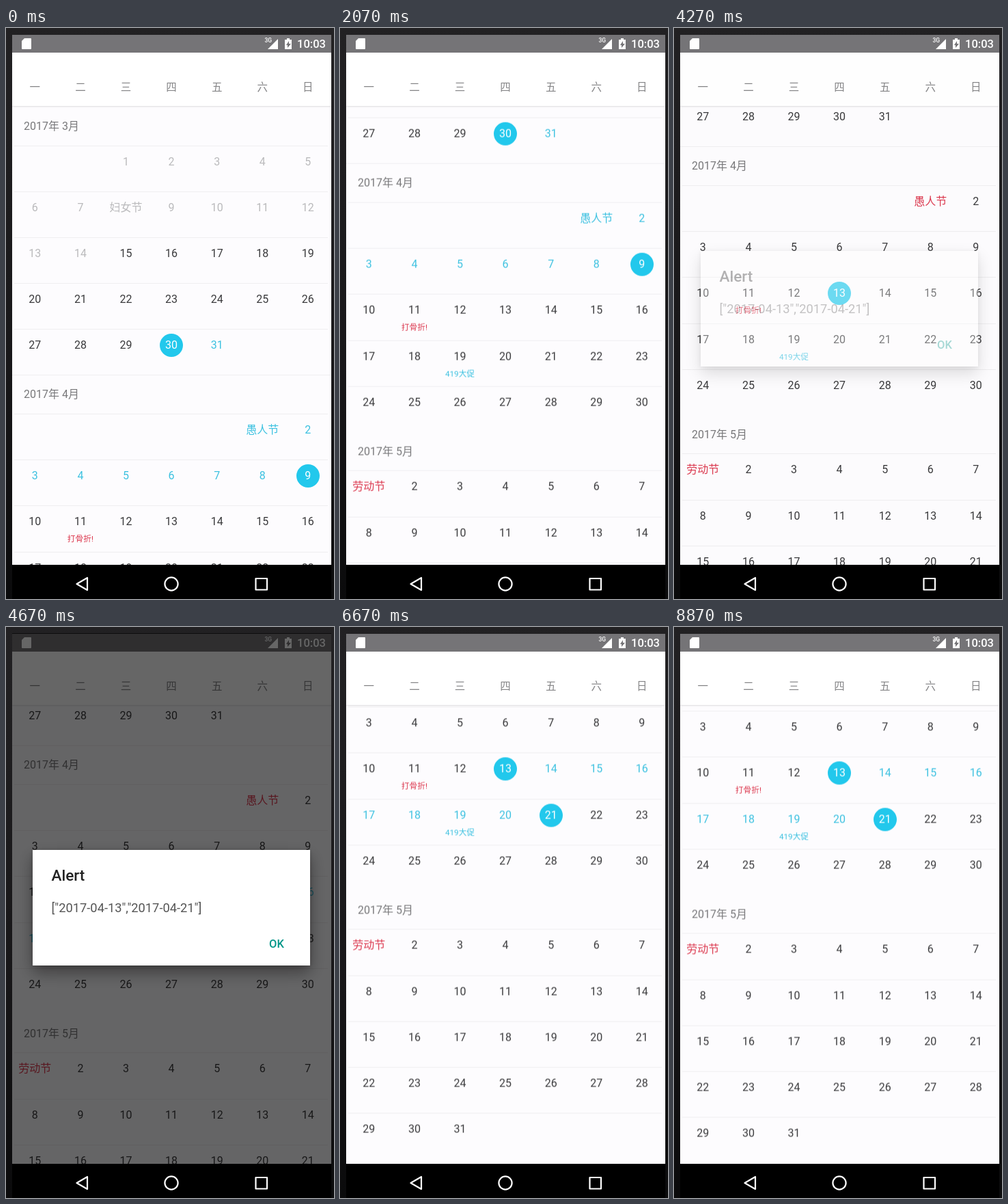
Recreate the animation shown at these times as an HTML page. Size 480 by 835 pixels, loop 8.94 s.

```html
<!DOCTYPE html>
<html lang="zh-CN">
<head>
<meta charset="utf-8">
<title>Calendar</title>
<style>
html, body { margin: 0; width: 100%; height: 100%; overflow: hidden; background: #000; }
body { font: 16px/34px Roboto, "Noto Sans CJK SC", "Noto Sans CJK", sans-serif; }
#stage { position: relative; width: 480px; height: 835px; overflow: hidden;
  background: linear-gradient(#222123, #181719 60%, #0b0b0c); }
#stage > * { position: absolute; }
#view { left: 9px; top: 36px; width: 467px; height: 749px; overflow: hidden; background: #fdfcfe; }
#list { position: absolute; top: 79px; left: 0; width: 467px; will-change: transform; }
.title { height: 56.5px; line-height: 58px; padding-left: 17px; color: #78787a; }
.week { position: relative; height: 67.2px; display: flex; }
.week::before { content: ""; position: absolute; left: 3px; right: 5px; top: 0; height: 1px; background: #efeef0; }
.month:nth-child(2) .title { box-shadow: inset 0 1px #efeef0; }
.day { width: 66.6px; flex: none; display: flex; flex-direction: column; align-items: center; }
.day b { font-weight: 400; width: 34px; height: 34px; margin-top: 7px; border-radius: 50%;
  display: flex; justify-content: center; white-space: nowrap; color: #3a3a3c; }
.day i { font: 11.7px/16px Roboto, "Noto Sans CJK SC", sans-serif; white-space: nowrap; }
.day .past { color: #bababc; }
.day .feast, .sale { color: #dc3a50; }
.promo, .day .in { color: #3cc1e0; }
.day .end { color: #fff; background: #22c8ec; }
#names { left: 0; top: 0; position: absolute; width: 467px; height: 78px; display: flex; background: #fff;
  box-shadow: 0 1px 2px #0002; color: #858587; font-size: 15.5px; }
#names span { width: 66.6px; text-align: center; padding-top: 34px; }
#dim { left: 9px; top: 9px; width: 467px; height: 776px; background: #000; }
#alert { left: 39px; top: 326px; width: 406px; height: 169px; background: #fff;
  box-shadow: 0 10px 22px #0006, 0 1px 6px #0003; white-space: nowrap; }
#alert div { position: absolute; left: 27.5px; }
</style>
</head>
<body>
<div id="stage">
  <div id="view"><div id="list"></div><div id="names"></div></div>
  <svg width="480" height="835" font-family="Roboto, sans-serif" fill="#fff">
    <path fill="#757477" d="M9 10H476V36H9z"/>
    <path d="M27 15h9q1 0 1 1v14q0 1-1 1H24q-1 0-1-1V19z"/>
    <text x="378.5" y="21" font-size="8.5" font-weight="500">3G</text>
    <path d="M398 16V31H383z"/>
    <path d="M411 15h4v2h3v14h-10V17h3z"/>
    <path fill="#757477" d="M414 19v4h3l-5 6v-4h-2z"/>
    <text x="426" y="29" font-size="16.5" font-weight="500">10:03</text>
    <path fill="#000" d="M9 785H476V835H9z"/>
    <g fill="none" stroke="#fff" stroke-width="2.2" stroke-linejoin="round">
      <path d="M119 804V822L103.500 813z"/>
      <circle cx="242" cy="813" r="9.600"/>
      <path d="M365.500 805H382V821.500H365.500z"/>
    </g>
  </svg>
  <div id="dim"></div>
  <div id="alert">
    <div style="top:20px;font-size:22.5px;font-weight:500;color:#212121">Alert</div>
    <div style="top:68px;font-size:18.3px;color:#555">["2017-04-13","2017-04-21"]</div>
    <div style="top:121px;left:346px;font-size:16.5px;font-weight:500;color:#009688">OK</div>
  </div>
</div>
<script>
const LOOP = 8940;
const $ = id => document.getElementById(id);
const feasts = { 308: '妇女节', 401: '愚人节', 501: '劳动节' };
const notes = { 411: ['sale', '打骨折!'], 419: ['promo', '419大促'] };
const days = [];

function add(parent, tag, cls, text = '') {
  const el = document.createElement(tag);
  el.className = cls;
  el.textContent = text;
  return parent.appendChild(el);
}

// Dates are keyed as month * 100 + day
function addMonth(m) {
  const box = add($('list'), 'div', 'month');
  add(box, 'div', 'title', `2017年 ${m}月`);
  const first = (new Date(2017, m - 1, 1).getDay() + 6) % 7;
  const count = new Date(2017, m, 0).getDate();
  let week;
  for (let i = 0; i < first + count; i++) {
    if (i % 7 === 0) week = add(box, 'div', 'week');
    const cell = add(week, 'div', 'day'), d = i - first + 1;
    if (d < 1) continue;
    const key = m * 100 + d;
    const base = key < 315 ? 'past' : feasts[key] ? 'feast' : '';
    days.push({ key, base, el: add(cell, 'b', base, feasts[key] || d) });
    if (notes[key]) add(cell, 'i', ...notes[key]);
  }
}

[3, 4, 5, 6].forEach(addMonth);
for (const c of '一二三四五六日') add($('names'), 'span', '', c);

let shown;
function select(from, to) {
  if (shown === from + to) return;
  shown = from + to;
  for (const { key, base, el } of days)
    el.className = key === from || key === to ? 'end' : key > from && key < to ? 'in' : base;
}

const ramp = (t, a, b) => Math.min(1, Math.max(0, (t - a) / (b - a)));

// Each drag: start, end, distance
const drags = [[900, 1400, 292], [1850, 2350, 42], [5930, 6640, 180.5], [7550, 7900, 25.5], [7900, 8330, -31.5]];
function scrollAt(t) {
  return drags.reduce((sum, [a, b, dist]) => {
    const p = ramp(t, a, b);
    return sum + dist * p * p * (3 - 2 * p);
  }, 0);
}

function draw(t) {
  $('list').style.transform = `translateY(${-scrollAt(t)}px)`;
  if (t < 3000) select(330, 409);
  else if (t < 4300) select(413, 413);
  else select(413, 421);
  $('alert').style.opacity = ramp(t, 4205, 4400) - ramp(t, 5640, 5840);
  $('dim').style.opacity = 0.6 * (ramp(t, 4270, 4500) - ramp(t, 5730, 5950));
}

function tick() {
  draw(performance.now() % LOOP);
  requestAnimationFrame(tick);
}
tick();
</script>
</body>
</html>
```
